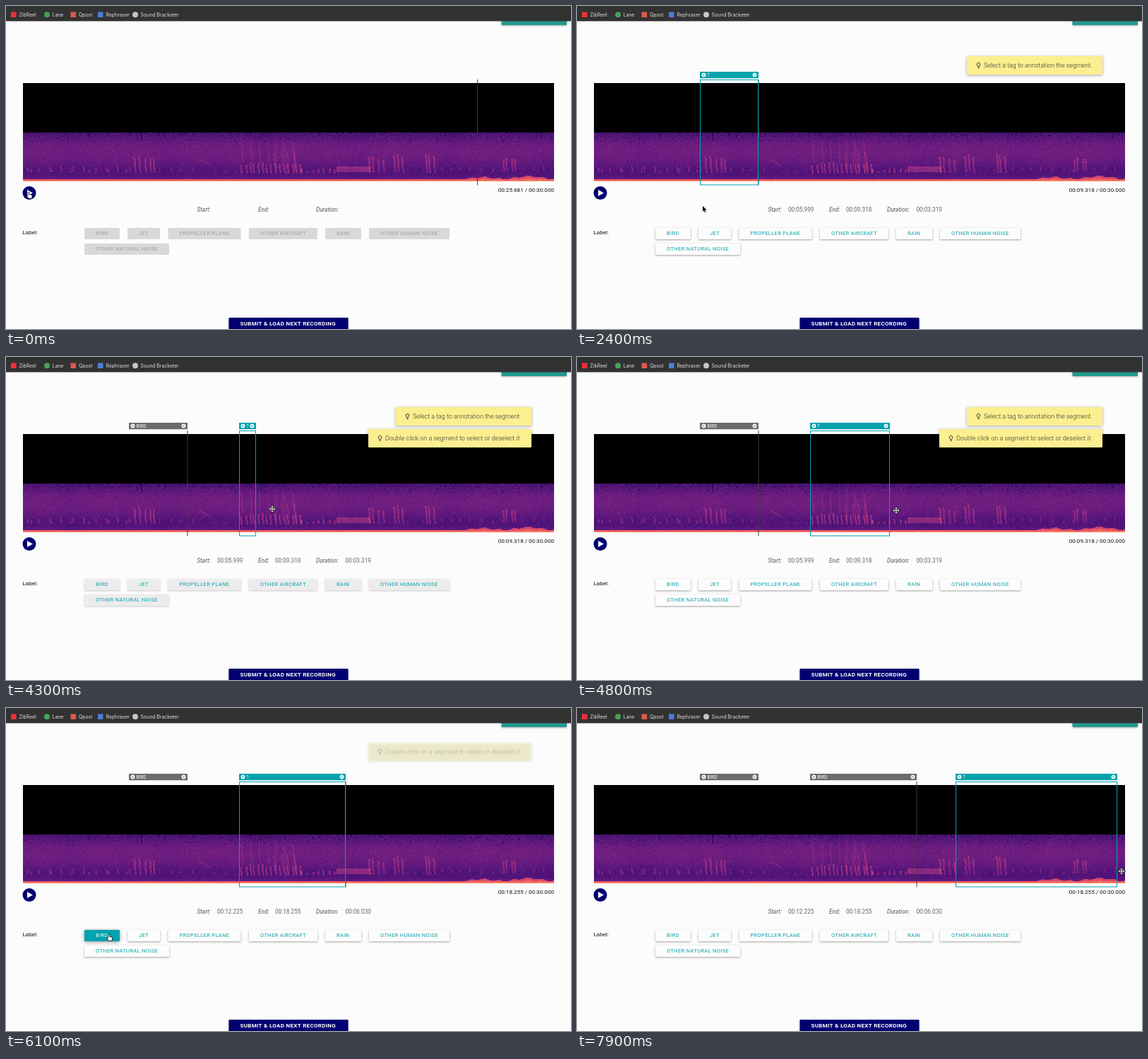
These frames come from a looping animation (800x457 px, 8 s). An HTML page with a canvas:

```html
<!DOCTYPE html>
<html lang="en">
<head>
<meta charset="utf-8">
<title>Sound labelling</title>
<style>
html, body { margin: 0; width: 100%; height: 100%; overflow: hidden; background: #fcfcfc; }
canvas { display: block; }
</style>
</head>
<body>
<canvas id="stage" width="800" height="457"></canvas>
<script>
const ctx = document.getElementById('stage').getContext('2d');
const LOOP = 8000, STEP = 100, DRAG_LAG = 60;
const TEAL = '#00a2ad', NAVY = '#000070';
const FONT = 'Roboto, sans-serif';

const clamp = (v, lo = 0, hi = 1) => Math.min(hi, Math.max(lo, v));
const mix = (a, b, p) => a + (b - a) * p;
const mixColor = (a, b, p) => `rgb(${a.map((v, i) => Math.round(mix(v, b[i], p))).join(',')})`;
const moveOrigin = (x, y) => ctx.transform(1, 0, 0, 1, x, y);

function text(str, x, y, size, color, { align = 'left', spacing = 0, family = FONT } = {}) {
  ctx.font = `${size} ${family}`;
  ctx.letterSpacing = spacing + 'px';
  ctx.textAlign = align;
  ctx.fillStyle = color;
  ctx.fillText(str, x, y);
  ctx.letterSpacing = '0px';
}

function disc(x, y, r, color) {
  ctx.fillStyle = color;
  ctx.beginPath();
  ctx.arc(x, y, r, 0, Math.PI * 2);
  ctx.fill();
}

function shape(points, fill, stroke, width = 1) {
  ctx.beginPath();
  points.forEach(([x, y]) => ctx.lineTo(x, y));
  ctx.closePath();
  if (stroke) {
    ctx.strokeStyle = stroke;
    ctx.lineWidth = width;
    ctx.lineJoin = 'round';
    ctx.stroke();
  }
  ctx.fillStyle = fill;
  ctx.fill();
}

function card(x, y, w, h, color, shadow = 0, blur = 3) {
  ctx.save();
  ctx.shadowColor = `rgba(0,0,0,${shadow})`;
  ctx.shadowBlur = blur;
  ctx.shadowOffsetY = 1;
  ctx.fillStyle = color;
  ctx.beginPath();
  ctx.roundRect(x, y, w, h, 1);
  ctx.fill();
  ctx.restore();
}

// Spectrogram
const HEAT = [[0, 0, 4], [28, 16, 68], [79, 18, 123], [129, 37, 129], [181, 54, 122],
  [229, 80, 100], [251, 135, 97], [254, 194, 135], [252, 253, 191]];

// x start, x end, spacing, top, bottom, strength
const CALLS = [
  [28, 180, 16, 226, 235, .16], [34, 180, 27, 229, 236, .17], [181, 212, 7, 213, 236, .19],
  [216, 262, 15, 227, 235, .12], [332, 416, 6, 221, 237, .22], [334, 412, 12, 188, 222, .07],
  [380, 414, 9, 205, 234, .1], [416, 470, 8, 229, 236, .22], [295, 330, 13, 231, 236, .12],
  [513, 521, 5, 210, 236, .19], [526, 536, 6, 214, 236, .16], [548, 562, 6, 209, 236, .18],
  [593, 608, 6, 210, 236, .18], [566, 590, 11, 229, 234, .1], [614, 664, 13, 226, 233, .13],
  [672, 700, 14, 228, 235, .14], [702, 722, 6, 213, 234, .17], [730, 770, 15, 226, 233, .12]
];

function makeSpectrogram() {
  const layer = document.createElement('canvas');
  const w = layer.width = 752, h = layer.height = 139;
  const g = layer.getContext('2d'), image = g.createImageData(w, h);
  let seed = 7123;
  const rand = () => (seed = (Math.imul(seed, 1664525) + 1013904223) >>> 0) / 4294967296;
  const heat = new Float32Array(w * h);

  for (let y = 70; y < h; y++) {
    const r = (y - 70) / 69;
    for (let x = 0; x < w; x++) {
      let v = .235 + .085 * Math.sin(Math.PI * clamp(r * 1.25 + .05)) + .025 * r;
      v += (rand() + rand() - 1) * .055 + .008 * Math.sin(x * .07) * Math.sin(x * .023);
      if (rand() < .2 * clamp(1 - r * 4.5)) v -= .13;
      if (r > .87) v += (r - .87) * .5;
      if (y >= 136) v = .6 + (y - 136) * .05 + rand() * .06;
      const glow = clamp((x - 500) / 180) * (6 + 2 * Math.sin(x * .09) + Math.sin(x * .31));
      if (h - y < glow) v = Math.max(v, mix(.45, .73, 1 - (h - y) / (glow + 1)) + rand() * .08);
      heat[y * w + x] = v;
    }
  }

  const add = (x, y, v) => { heat[(y - 109) * w + x - 24] += v; };
  for (const [x0, x1, gap, top, bottom, power] of CALLS) {
    for (let x = x0; x <= x1; x += gap) {
      const left = Math.round(x + rand() * 2), start = Math.round(top + rand() * 4);
      for (let y = start; y < bottom; y++) {
        const lean = Math.round((bottom - y) / 14);
        for (let i = 0; i < 3; i++) add(left + i - lean, y, power * (i === 1 ? 1 : .55) * (.4 + rand() * .7));
      }
    }
  }
  for (let x = 468; x < 516; x++) for (let y = 227; y < 235; y++) add(x, y, .12 + rand() * .06);
  for (let x = 274; x < 291; x++) add(x, Math.round(217 + (x - 274) * .55), .13);
  for (let y = 179; y < 192; y++) add(192, y, -.2);

  heat.forEach((v, i) => {
    const s = clamp(v, 0, .999) * 8, k = Math.floor(s);
    for (let c = 0; c < 3; c++) image.data[i * 4 + c] = i < 70 * w ? 0 : mix(HEAT[k][c], HEAT[k + 1][c], s - k);
    image.data[i * 4 + 3] = 255;
  });
  g.putImageData(image, 0, 0);
  return layer;
}
const spectrogram = makeSpectrogram();

// Pointer path: time, x, y, look until the next stop
const PATH = [
  [0, 32, 264, 'hand'], [300, 32, 264, 'arrow'], [950, 174, 231, 'arrow'], [1150, 174, 231, 'move'],
  [1500, 223, 231, 'move'], [1800, 257, 231, 'move'], [2000, 257, 231, 'arrow'], [2400, 178, 283, 'arrow'],
  [2600, 142, 321, 'hand'], [2850, 142, 321, 'arrow'], [3850, 330, 214, 'arrow'], [4150, 330, 214, 'move'],
  [4240, 354, 215, 'move'], [4300, 377, 215, 'move'], [5000, 482, 218, 'move'], [5350, 482, 218, 'arrow'],
  [5900, 144, 321, 'hand'], [6200, 146, 321, 'arrow'], [6300, 165, 300, 'arrow'], [6600, 536, 230, 'arrow'],
  [6800, 536, 230, 'move'], [7840, 765, 231, 'move'], [7900, 771, 231, 'move']
];

function pointerAt(t) {
  let i = PATH.length - 1;
  while (i && PATH[i][0] > t) i--;
  const a = PATH[i], b = PATH[i + 1] || a;
  let p = b === a ? 0 : (t - a[0]) / (b[0] - a[0]);
  if (a[3] !== 'move') p = p * p * (3 - 2 * p);
  return { x: mix(a[1], b[1], p), y: mix(a[2], b[2], p), look: a[3] };
}

function drawPointer({ x, y, look }) {
  ctx.save();
  moveOrigin(x, y);
  if (look === 'arrow') {
    shape([[0, 0], [0, 8], [1.8, 6.3], [3, 9], [4.3, 8.4], [3.1, 5.8], [5.5, 5.6]], '#000', '#fff', 1.4);
  } else if (look === 'hand') {
    shape([[-.6, 0], [.7, 0], [1, 3], [4, 3.6], [4.8, 4.6], [4.2, 8], [.2, 8], [-2.6, 4.6], [-1.8, 4], [-.5, 5]],
      '#fff', '#111', 1.5);
  } else {
    const arms = (color, width) => {
      ctx.strokeStyle = color;
      ctx.lineWidth = width;
      ctx.beginPath();
      ctx.moveTo(-4, 0); ctx.lineTo(4, 0);
      ctx.moveTo(0, -4); ctx.lineTo(0, 4);
      for (const [u, v] of [[1, 0], [-1, 0], [0, 1], [0, -1]]) {
        ctx.moveTo(2.6 * u + 1.5 * v, 2.6 * v + 1.5 * u);
        ctx.lineTo(4.2 * u, 4.2 * v);
        ctx.lineTo(2.6 * u - 1.5 * v, 2.6 * v - 1.5 * u);
      }
      ctx.stroke();
    };
    arms('#111', 2.6);
    arms('#fff', 1);
  }
  ctx.restore();
}

// Segments
const SEGMENTS = [
  { from: 174, to: 257, start: 1150, release: 1850, tagged: 2750, info: ['00:05.999', '00:09.318', '00:03.319'] },
  { from: 330, to: 481, start: 4150, release: 5100, tagged: 6200, info: ['00:12.225', '00:18.255', '00:06.030'] },
  { from: 536, to: 776, start: 6800, release: LOOP, tagged: LOOP }
];

function drawSegment(s, t) {
  if (t <= s.start) return;
  const end = t >= s.release ? s.to : Math.min(s.to, pointerAt(t - DRAG_LAG).x);
  const w = Math.round(end) - s.from;
  if (w < 1) return;
  const tagged = t >= s.tagged, color = tagged ? '#6c6c6c' : TEAL;
  if (!tagged) {
    ctx.strokeStyle = TEAL;
    ctx.lineWidth = 1;
    ctx.strokeRect(s.from + .5, 104.5, w - 1, 148.5);
  }
  ctx.save();
  ctx.beginPath();
  ctx.rect(s.from, 93, w, 9.5);
  ctx.clip();
  ctx.fillStyle = color;
  ctx.fillRect(s.from, 93, w, 9.5);
  const x0 = s.from + 5.5, x1 = s.from + w - 5.5;
  disc(x0, 97.5, 2.9, '#fff');
  shape([[x0 - .8, 96], [x0 + 1.4, 97.5], [x0 - .8, 99]], color);
  text(tagged ? 'BIRD' : '?', s.from + 10.5, 99.8, '6.5px', '#fff');
  disc(x1, 97.5, 2.9, '#fff');
  ctx.strokeStyle = color;
  ctx.lineWidth = .9;
  ctx.beginPath();
  ctx.moveTo(x1 - 1.2, 96.3); ctx.lineTo(x1 + 1.2, 98.7);
  ctx.moveTo(x1 + 1.2, 96.3); ctx.lineTo(x1 - 1.2, 98.7);
  ctx.stroke();
  ctx.restore();
}

// Tag buttons
const TAGS = [
  ['BIRD', 111, 314, 50], ['JET', 172, 314, 46], ['PROPELLER PLANE', 229.5, 314, 103],
  ['OTHER AIRCRAFT', 344, 314, 97], ['RAIN', 452, 314, 51], ['OTHER HUMAN NOISE', 514, 314, 114],
  ['OTHER NATURAL NOISE', 111, 336, 120]
];

function drawTags(t, pointer) {
  const active = SEGMENTS.find(s => t >= s.start && t < s.tagged);
  const on = active ? clamp((t - active.start) / 270) : 0;
  for (const [label, x, y, w] of TAGS) {
    const hover = on === 1 && pointer.look === 'hand' && label === 'BIRD' && pointer.y > 310;
    const back = hover ? TEAL : mixColor([216, 216, 216], [252, 252, 252], on);
    const ink = hover ? '#fff' : mixColor([158, 158, 158], [8, 162, 172], clamp(on * 1.8));
    card(x, y, w, 16, back, hover ? .45 : .36 * on, hover ? 5 : 3);
    text(label, x + 16, y + 10.4, '7.5px', ink, { spacing: .35 });
  }
}

// Hints
function fadeOut(t, start) {
  const p = clamp((t - start) / 375), lift = 40 * (1 - (1 - p) ** 2);
  return { lift, alpha: clamp(1 - (lift / 27) ** 1.7) };
}

function drawToast(message, x, y, t, shown, hidden) {
  const enter = clamp((t - shown) / 300), out = fadeOut(t, hidden);
  const alpha = enter * out.alpha;
  if (alpha <= 0) return;
  ctx.save();
  ctx.globalAlpha = alpha;
  moveOrigin(x, y + 35 * (1 - enter) ** 2 - out.lift);
  card(0, 0, 744 - x, 26, '#fbef8f', .35, 4);
  ctx.strokeStyle = '#333';
  ctx.lineWidth = 1;
  ctx.beginPath();
  ctx.arc(16.5, 11.7, 2.3, Math.PI * .7, Math.PI * 2.3);
  ctx.lineTo(17.5, 15); ctx.lineTo(15.5, 15);
  ctx.closePath();
  ctx.moveTo(15.5, 16.6); ctx.lineTo(17.5, 16.6);
  ctx.stroke();
  text(message, 24, 16.1, '300 8.95px', '#333');
  ctx.restore();
}

function drawPage() {
  ctx.fillStyle = '#fcfcfc';
  ctx.fillRect(0, 0, 800, 457);
  card(701.5, 14, 92.5, 13, '#22998e', .35, 3);
  ctx.fillStyle = '#323232';
  ctx.fillRect(0, 0, 800, 21.5);

  const bookmark = (label, x, color, square) => {
    if (square) {
      ctx.fillStyle = color;
      ctx.fillRect(x - 11.5, 8.5, 7.5, 7.5);
    } else disc(x - 7.5, 12.2, 4, color);
    text(label, x, 14.6, '6.9px', '#dedede', { family: 'Inter, sans-serif' });
  };
  bookmark('ZibReel', 18.5, '#f0303a', true);
  bookmark('Lane', 65.5, '#45a35a');
  bookmark('Qpost', 103, '#e2574c', true);
  bookmark('Rephraser', 141.5, '#4a7fd8', true);
  bookmark('Sound Bracketer', 190.5, '#c4c6c8');

  ctx.drawImage(spectrogram, 24, 109);
  disc(33, 264.5, 9.5, NAVY);
  shape([[30, 260], [38, 264.5], [30, 269]], '#fff');
  text('Label:', 23.5, 322.8, '8.1px', '#111');
  card(315.5, 441, 169, 20, NAVY, .35, 3);
  text('SUBMIT & LOAD NEXT RECORDING', 331.5, 451.6, 'bold 8px', '#fff', { spacing: .3 });
}

function drawInfo(info, clock) {
  [['Start:', 270.5, 299], ['End:', 357, 381], ['Duration:', 439, 480.5]].forEach(([label, x, valueX], i) => {
    text(label, x, 291, 'italic 8.2px', '#555');
    if (info) text(info[i], valueX, 291, '8.2px', '#666');
  });
  text(clock + ' / 00:30.000', 776, 263, '8.1px', '#111', { align: 'right' });
}

function draw(t) {
  const pointer = pointerAt(t);
  const last = SEGMENTS.filter(s => t >= s.release).pop();
  drawPage();
  drawInfo(last && last.info, last ? last.info[1] : '00:25.681');
  ctx.fillStyle = '#3c3c3c';
  ctx.fillRect(last ? last.to - .5 : 667, 104, 1, 149.5);
  SEGMENTS.forEach(s => drawSegment(s, t));
  drawTags(t, pointer);

  const pushed = t < 5525 ? 31 - Math.min(31, fadeOut(t, 5150).lift) : 0;
  drawToast('Select a tag to annotation the segment.', 552, 71, t, 1850, 5150);
  drawToast('Double click on a segment to select or deselect it.', 513, 71 + pushed, t, 2750, 5975);
  drawPointer(pointer);
}

function frame(now) {
  draw(Math.floor((now % LOOP) / STEP) * STEP);
  requestAnimationFrame(frame);
}
requestAnimationFrame(frame);
</script>
</body>
</html>
```
